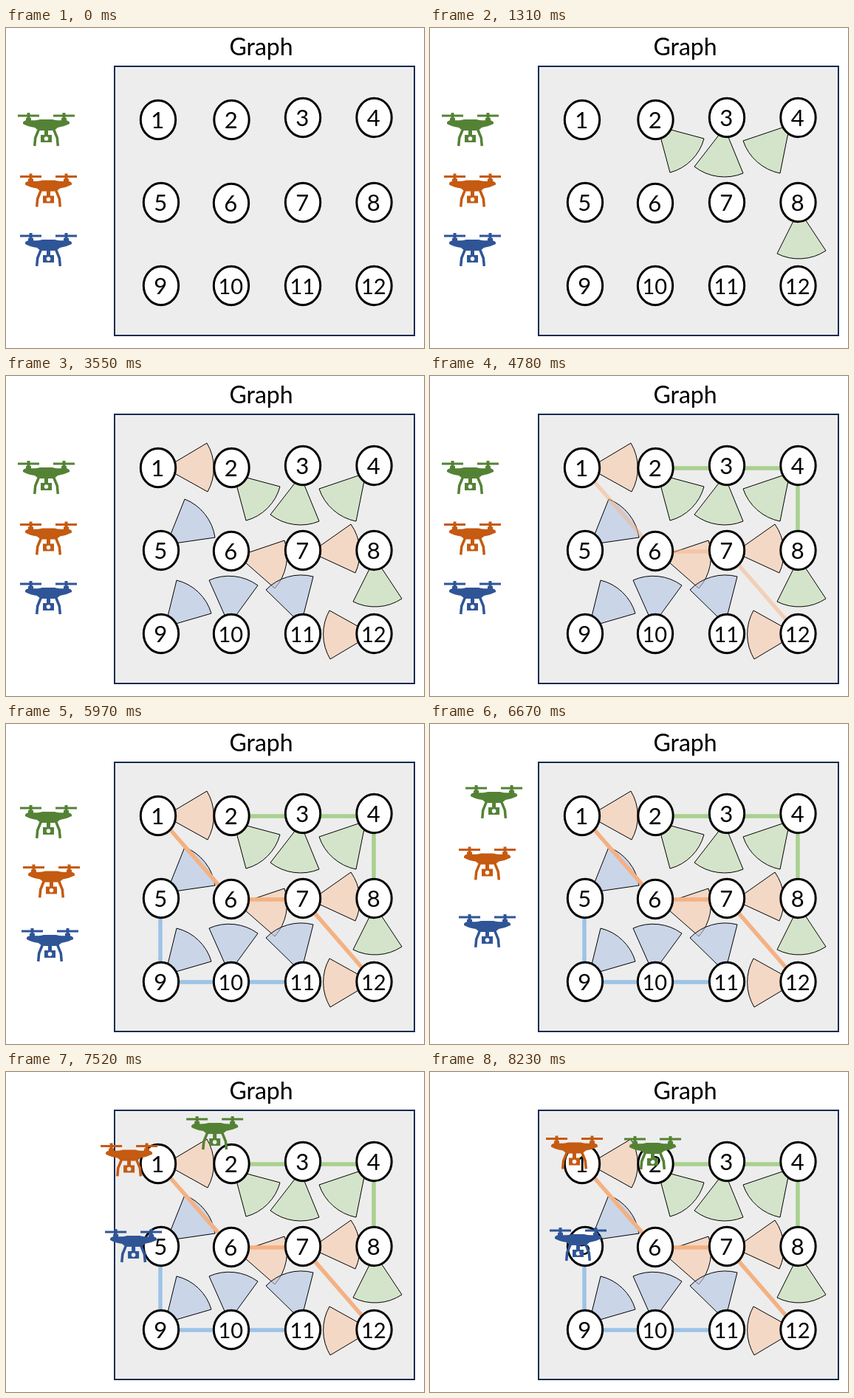
Write an HTML page that moves like this. It is 566x434 px and loops after 8990 ms.

```html
<!DOCTYPE html>
<html lang="en">
<head>
<meta charset="utf-8">
<title>Graph</title>
<style>
  html, body { margin: 0; width: 100%; height: 100%; overflow: hidden; background: #fff; }
  svg { display: block; width: 100%; height: 100%; }
  text { font-family: Lato, "Open Sans", sans-serif; text-anchor: middle; }
  .cones { stroke: #000; stroke-width: 1; fill-opacity: .6; stroke-linejoin: round; }
  .edges { fill: none; stroke-width: 5.5; }
  ellipse { fill: #fff; stroke: #000; stroke-width: 3; }
</style>
</head>
<body>
<svg id="stage" viewBox="0 0 566 434">
  <defs>
    <g id="drone">
      <path d="M0 4H29M48 4H77" fill="none" stroke="currentColor" stroke-width="3"/>
      <path d="M12.5 0h4v8h-4zM60.5 0h4v8h-4zM11 7h7v7h-7zM59 7h7v7h-7z"/>
      <path d="M7 15Q6 11 12 10Q25 11 30 9H47Q52 11 65 10Q71 11 70 15Q62 19 54 20Q50 24 46 24H31Q27 24 23 20Q14 19 7 15Z"/>
      <path d="M29 21L23.7 34L22.7 45M48 21L53.3 34L54.3 45" fill="none" stroke="currentColor" stroke-width="3.5"/>
      <path fill-rule="evenodd" d="M36 23h5v7h5v10h-15v-10h5zM35.7 35a2.8 2.8 0 1 0 5.6 0a2.8 2.8 0 1 0 -5.6 0z"/>
    </g>
  </defs>
  <rect x="147" y="52" width="406" height="365" fill="#ededed" stroke="#172c51" stroke-width="2"/>
  <text x="345.5" y="37" font-size="32">Graph</text>
</svg>
<script>
const LOOP = 8990;
const stage = document.getElementById('stage');

function add(parent, tag, attrs, text) {
  const el = document.createElementNS('http://www.w3.org/2000/svg', tag);
  for (const k in attrs) el.setAttribute(k, attrs[k]);
  if (text) el.textContent = text;
  return parent.appendChild(el);
}

// A 60° sector given by the two ends of its arc, clockwise.
function sector([x1, y1, x2, y2]) {
  const dx = x2 - x1, dy = y2 - y1, h = Math.sqrt(3) / 2, r = Math.hypot(dx, dy);
  const ax = (x1 + x2) / 2 - dy * h, ay = (y1 + y2) / 2 + dx * h;
  return `M${ax} ${ay}L${x1} ${y1}A${r} ${r} 0 0 1 ${x2} ${y2}Z`;
}

const cones = [
  { fill: '#c5e0b4', from: 20, to: 490, arcs: [
    [371, 150, 325, 196], [424, 197, 358, 188], [474, 197, 424, 153], [536, 302, 470, 306]] },
  { fill: '#f8cbad', from: 1310, to: 1990, arcs: [
    [272, 91, 273, 157], [377, 223, 364, 288], [467, 201, 473, 267], [439, 384, 438, 318]] },
  { fill: '#b4c7e7', from: 2540, to: 3110, arcs: [
    [242, 167, 283, 219], [231, 277, 278, 322], [275, 277, 341, 284], [352, 290, 416, 272]] }
];
const edges = [
  { stroke: '#a9d18e', from: 3550, to: 3990, d: 'M305 125H498V236' },
  { stroke: '#f4b183', from: 4580, to: 4990, d: 'M206 124.5L305 238H402L498.5 349.5' },
  { stroke: '#9dc3e6', from: 5260, to: 5660, d: 'M209 236V350H402' }
];
const nodes = [
  [206, 124.5], [305.5, 124.5], [402, 121.5], [498.5, 121.5],
  [210, 236.5], [305, 237.5], [402, 236.5], [498.5, 236.5],
  [210, 349.5], [305, 349.5], [402, 349.5], [498.5, 349.5]
];

// Flight offsets at the given times.
const times = [5970, 6670, 6860, 7200, 7520, 7780, 8230];
const drones = [
  { color: '#c55a11', x: 19, y: 197.5,
    dx: [4, 20, 33, 71, 109, 131, 138], dy: [-7, -31, -46, -78, -101, -109, -111] },
  { color: '#548235', x: 16, y: 115,
    dx: [3, 32, 69, 153, 228, 244, 247], dy: [-5, -32, -62, -88, -55, -37, -28] },
  { color: '#2f5597', x: 19, y: 278,
    dx: [2, 20, 34, 76, 115, 136, 143], dy: [-1, -20, -36, -56, -65, -67, -67] }
];

for (const c of cones) {
  c.el = add(stage, 'g', { class: 'cones', fill: c.fill });
  c.arcs.forEach(a => add(c.el, 'path', { d: sector(a) }));
}
for (const e of edges) e.el = add(stage, 'path', { class: 'edges', stroke: e.stroke, d: e.d });
nodes.forEach(([cx, cy], i) => {
  add(stage, 'ellipse', { cx, cy, rx: 23.7, ry: 26.2 });
  add(stage, 'text', { x: cx - .7, y: cy + 11.7, 'font-size': i < 9 ? 31 : 29 }, i + 1);
});
for (const d of drones) d.el = add(stage, 'use', { href: '#drone', fill: d.color, color: d.color });

// Smooth curve through the values, at rest at both ends.
function glide(v, t) {
  const last = times.length - 1;
  if (t < times[0]) return 0;
  if (t >= times[last]) return v[last];
  const i = times.findIndex(k => k > t) - 1;
  const slope = j => j % last ? (v[j + 1] - v[j - 1]) / (times[j + 1] - times[j - 1]) : 0;
  const h = times[i + 1] - times[i], u = (t - times[i]) / h, w = 1 - u;
  return w * w * (1 + 2 * u) * v[i] + u * u * (1 + 2 * w) * v[i + 1]
    + h * u * w * (w * slope(i) - u * slope(i + 1));
}

function draw() {
  const t = performance.now() % LOOP;
  for (const f of [...cones, ...edges]) {
    f.el.setAttribute('opacity', Math.min(1, Math.max(0, (t - f.from) / (f.to - f.from))));
  }
  for (const d of drones) {
    d.el.setAttribute('transform', `translate(${d.x + glide(d.dx, t)} ${d.y + glide(d.dy, t)})`);
  }
  requestAnimationFrame(draw);
}
draw();
</script>
</body>
</html>
```
